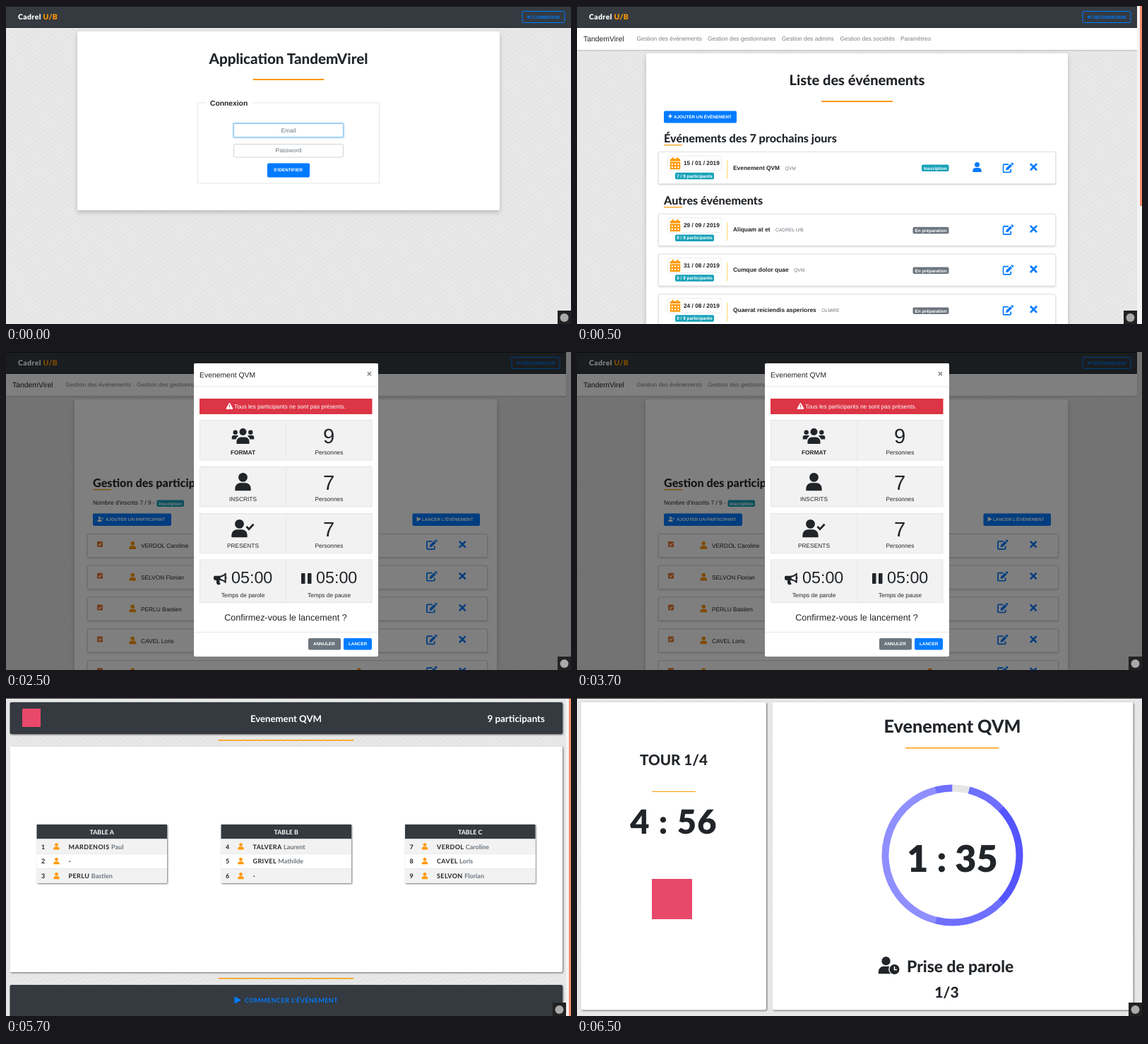
Recreate the animation shown at these times as an HTML page. Size 800x450 px, loop 8000 ms.

```html
<!DOCTYPE html>
<html lang="fr">
<head>
<meta charset="utf-8">
<title>Rencontres</title>
<style>
html, body { margin: 0; width: 100%; height: 100%; overflow: hidden; background: #e8e8e8; }
svg.stage { display: block; width: 100%; height: 100%; }
text { font-family: "Liberation Sans", Arial, sans-serif; fill: #212529; text-rendering: geometricPrecision; white-space: pre; }
.l { font-family: Lato, sans-serif; font-weight: 700; }
.h { font-family: Lato, sans-serif; font-weight: 800; }
.k { font-family: Lato, sans-serif; font-weight: 900; }
.b { font-weight: 700; }
.m { text-anchor: middle; }
.soft { filter: drop-shadow(0 3px 3px rgba(0,0,0,.2)); }
.hard { filter: drop-shadow(1px 1px 1.2px rgba(0,0,0,.55)); }
.ss { filter: drop-shadow(0 1px .8px rgba(0,0,0,.18)); }
.scene { visibility: hidden; animation: 8s step-end infinite; }
#login { animation-name: login; }
#list { animation-name: list; }
#launch { animation-name: launch; }
#tables { animation-name: tables; }
#timer { animation-name: timer; }
@keyframes login { 0% { visibility: visible } 6.25%, 100% { visibility: hidden } }
@keyframes list { 0% { visibility: hidden } 6.25% { visibility: visible } 31.25%, 100% { visibility: hidden } }
@keyframes launch { 0% { visibility: hidden } 31.25% { visibility: visible } 56.25%, 100% { visibility: hidden } }
@keyframes tables { 0% { visibility: hidden } 56.25% { visibility: visible } 81.25%, 100% { visibility: hidden } }
@keyframes timer { 0% { visibility: hidden } 81.25%, 100% { visibility: visible } }
</style>
</head>
<body>
<svg class="stage" viewBox="0 0 800 450">
  <defs>
    <pattern id="hatch" width="6" height="5" patternUnits="userSpaceOnUse" patternTransform="rotate(-35)">
      <rect width="6" height="5" fill="#e9e9e9"/><rect width="6" height="2.2" fill="#e4e4e4"/>
    </pattern>
    <symbol id="user" viewBox="0 0 16 16"><g fill="currentColor"><circle cx="8" cy="4" r="4"/><path d="M1 16v-2.2A4.8 4.8 0 0 1 5.8 9h4.4a4.8 4.8 0 0 1 4.8 4.8V16z"/></g></symbol>
    <symbol id="users" viewBox="0 0 32 22"><g fill="currentColor"><circle cx="16" cy="5" r="5"/><path d="M7 22v-3.5a6 6 0 0 1 6-6h6a6 6 0 0 1 6 6V22z"/><circle cx="5.2" cy="5.8" r="3.2"/><circle cx="26.8" cy="5.8" r="3.2"/><path d="M0 15.5V13a3 3 0 0 1 3-3h4.5q1.5 0 2.3.8-3 1.7-3.6 4.7zM32 15.5V13a3 3 0 0 0-3-3h-4.5q-1.5 0-2.3.8 3 1.7 3.6 4.7z"/></g></symbol>
    <symbol id="cal" viewBox="0 0 14 16"><path fill="currentColor" fill-rule="evenodd" d="M0 5V3.5Q0 2 1.5 2H3V0H5V2H9V0H11V2H12.5Q14 2 14 3.5V5zM0 6H14V14.5Q14 16 12.5 16H1.5Q0 16 0 14.5zM2 8V10H4V8zM6 8V10H8V8zM10 8V10H12V8zM2 12V14H4V12zM6 12V14H8V12zM10 12V14H12V12z"/></symbol>
    <symbol id="edit" viewBox="0 0 17 16"><path fill="none" stroke="currentColor" stroke-width="1.9" d="M9 3H2.5Q1 3 1 4.5V13.5Q1 15 2.5 15H11Q12.5 15 12.5 13.5V10.5"/><path fill="currentColor" d="M5.5 8.8L11.8 2.5 14.5 5.2 8.2 11.5 5 12zM12.6 1.7l1-1q.8-.7 1.6 0l1.2 1.2q.6.7 0 1.5l-1.1 1.1z"/></symbol>
    <symbol id="cross" viewBox="0 0 10 10"><path fill="none" stroke="currentColor" stroke-width="2.4" stroke-linecap="round" d="M1.5 1.5L8.5 8.5M8.5 1.5L1.5 8.5"/></symbol>
    <symbol id="plus" viewBox="0 0 10 10"><path fill="none" stroke="currentColor" stroke-width="2.4" d="M5 .5V9.5M.5 5H9.5"/></symbol>
    <symbol id="enter" viewBox="0 0 12 10"><path fill="currentColor" d="M0 3.5H3.5V1L8 5 3.5 9V6.5H0z"/><path fill="none" stroke="currentColor" stroke-width="1.5" d="M8 1H10Q11 1 11 2V8Q11 9 10 9H8"/></symbol>
    <symbol id="play" viewBox="0 0 10 10"><path fill="currentColor" d="M1 .5Q1-.3 2 .2L9.4 4.3Q10.2 5 9.4 5.7L2 9.8Q1 10.3 1 9.5z"/></symbol>
    <symbol id="horn" viewBox="0 0 20 18"><path fill="currentColor" fill-rule="evenodd" d="M2 5H8Q13 5 17 .8 18.2 0 18.2 1.5V6.5Q20 7.5 18.2 9.5V14.5Q18.2 16 17 15.2 13 11.5 8.5 11.2 8 14 10 16.5 9.5 18 8 18H5.5Q3.5 15 4 11.2H2Q0 11.2 0 9V7Q0 5 2 5zM16 4Q13 6.5 10 6.9V9.3Q13 9.8 16 12.2z"/></symbol>
    <symbol id="warn" viewBox="0 0 18 16"><path fill="currentColor" fill-rule="evenodd" d="M7.7.8Q9-.8 10.3.8L17.7 13.7Q18.3 16 16.3 16H1.7Q-.3 16 .3 13.7zM7.9 5L8.3 10.5H9.7L10.1 5zM7.8 12V14H10.2V12z"/></symbol>
  </defs>
</svg>
<script>
const BLUE = '#007bff', DARK = '#343a40', TEAL = '#17a2b8', GREY = '#6c757d', AMBER = '#ff9800', INK = '#212529';
const EVENT = 'Evenement QVM', APP = 'TandemVirel';

const rect = (x, y, w, h, fill, more = '') =>
  `<rect x="${x}" y="${y}" width="${w}" height="${h}" fill="${fill}" ${more}/>`;
const text = (x, y, s, size, cls = '', fill = INK, more = '') =>
  `<text x="${x}" y="${y}" font-size="${size}" class="${cls}" style="fill:${fill}" ${more}>${s}</text>`;
const icon = (id, x, y, w, h, color = BLUE) =>
  `<use href="#${id}" x="${x}" y="${y}" width="${w}" height="${h}" color="${color}"/>`;
const box = (x, y, w, h, stroke, fill = '#fff', more = '') =>
  rect(x + .5, y + .5, w - 1, h - 1, fill, `stroke="${stroke}" ${more}`);
const button = (x, y, w, h, s, tx, color = BLUE) =>
  rect(x, y, w, h, color, 'rx="2"') + text(tx, y + h / 2 + 1.7, s, 6.3, 'b', '#fff');
const badge = (x, y, w, s, color = TEAL) =>
  rect(x, y, w, 9.5, color, 'rx="2"') + text(x + w / 2, y + 7, s, 6.4, 'b m', '#fff');
const bar = (x, y, w, h = 2) => rect(x, y, w, h, AMBER, 'rx=".7"');
const panel = (x, y, w, h, fill = '#fff', shadow = 'hard') => rect(x, y, w, h, fill, `rx="2" class="${shadow}"`);
const page = rect(0, 0, 800, 450, 'url(#hatch)');
const topLine = rect(0, 0, 800, 1, '#3a3a3f');
const corner = x => rect(x, 431, 19, 19, '#222') + `<circle cx="${x + 9.5}" cy="441" r="6" fill="#aaa"/>`;
const scroll = h => rect(793, 0, 7, 450, '#f3f3f3') + rect(797, 0, 3, h, '#f58c6c');

const header = (w, label, bx) =>
  rect(0, 0, w, 30, DARK) + rect(0, 30, w, 1, '#221e29') + rect(0, 0, w, 1, '#15171a') +
  text(17, 19, `Cadrel <tspan fill="${AMBER}">U/B</tspan>`, 10.4, 'k', '#fff', 'letter-spacing=".4"') +
  box(bx, 7, w - bx - 8.5, 17, BLUE, 'none', 'rx="2"') +
  icon('enter', bx + 7, 12.5, 7, 6) + text(bx + 15.5, 17.8, label, 6.25, 'b', BLUE);

const links = [[84.5, 'Gestion des événements'], [185, 'Gestion des gestionnaires'], [290, 'Gestion des admins'],
  [372.5, 'Gestion des sociétés'], [458, 'Paramètres']];
const nav = rect(0, 31, 793, 31, '#fff', 'class="ss"') + text(9, 50, APP, 10.4) +
  links.map(([x, s]) => text(x, 49, s, 8.35, '', '#7f7f7f')).join('');
const heading = (y, s) => text(123, y, s, 16.2, 'h') + rect(123, y + 3.2, 26, 1.2, AMBER);

const login = () => page + header(800, 'CONNEXION', 730.5) + panel(101, 36, 598, 253, '#fff', 'soft') +
  text(400, 82, 'Application ' + APP, 20.6, 'h m') + bar(349.5, 103, 101) +
  box(271, 136.5, 258, 115, '#e6e6e6') + rect(284, 134, 65, 6, '#fff') +
  text(289, 141, 'Connexion', 10.3, 'b') +
  rect(320.5, 164.5, 159, 23, '#c4e2fa', 'rx="3"') +
  box(322, 166, 156, 20, '#86c3f2', '#fff', 'rx="2"') + text(400, 179, 'Email', 8.4, 'm', GREY) +
  box(322, 195, 156, 19.5, '#ced4da', '#fff', 'rx="2"') + text(400, 207, 'Password', 8.4, 'm', GREY) +
  button(370, 222.5, 60, 20, "S'IDENTIFIER", 379) + corner(781);

const events = [
  [206, '15 / 01 / 2019', '7', EVENT, 'QVM'],
  [293.7, '29 / 09 / 2019', '0', 'Aliquam at et', 'CADREL U/B'],
  [350.6, '31 / 08 / 2019', '0', 'Cumque dolor quae', 'QVM'],
  [407.5, '24 / 08 / 2019', '0', 'Quaerat reiciendis asperiores', 'OLMIRE']];
const eventRow = ([y, date, n, name, org], i) => `<g transform="translate(0 ${y})">` +
  box(115, 0, 563, 46, '#e2e2e2', '#fff', 'rx="1" class="ss"') +
  box(128, 5.5, 77, 22, '#ececec', '#fff', 'rx="2"') + icon('cal', 131.5, 8, 15, 17.5, AMBER) +
  text(151, 19.2, date, 8.3, 'b') + badge(139, 29.7, 55, n + ' / 9 participants') +
  rect(212, 12.5, 1.5, 26, '#ffe08a') +
  text(221, 25.8, `${name}<tspan dx="7.5" font-size="6.67" font-weight="400" fill="${GREY}">${org}</tspan>`, 8.4, 'b') +
  (i ? badge(475.5, 19, 51, 'En préparation', GREY) : badge(488, 18.5, 38.5, 'Inscription') + icon('user', 559, 15, 15, 14)) +
  icon('edit', 602.5, 15, 16, 15.5) + icon('cross', 641, 16.3, 11, 11) + '</g>';

const list = () => page + header(793, 'DÉCONNEXION', 715.5) + nav + panel(98, 67, 597, 400, '#fff', 'soft') +
  text(396.5, 112, 'Liste des événements', 20, 'h m') + bar(346, 134, 101) +
  button(123, 148.5, 103, 17, 'AJOUTER UN ÉVÉNEMENT', 137) + icon('plus', 129, 153, 6, 6, '#fff') +
  heading(193, 'Événements des 7 prochains jours') + heading(281, 'Autres événements') +
  events.map(eventRow).join('') + scroll(283) + corner(774);

const people = { a: ['VERDOL', 'Caroline'], b: ['SELVON', 'Florian'], c: ['PERLU', 'Bastien'], d: ['CAVEL', 'Loris'],
  e: ['MARDENOIS', 'Paul'], f: ['TALVERA', 'Laurent'], g: ['GRIVEL', 'Mathilde'], _: ['-', ''] };
const personRow = (id, i) => `<g transform="translate(0 ${257 + i * 44.8})">` +
  box(115, 0, 567, 34, '#d8d8d8', '#fff', 'rx="1" class="ss"') +
  rect(129, 11, 8, 8, '#e8742c', 'rx="1"') +
  '<path d="M130.8 15l1.7 1.8 3-3.5" fill="none" stroke="#fff" stroke-width="1.2"/>' +
  icon('user', 173.5, 11, 11.5, 11, AMBER) + text(191, 20.2, people[id].join(' '), 8.33) +
  icon('user', 494, 11, 11.5, 11, AMBER) +
  icon('edit', 595, 8, 16, 15) + icon('cross', 641, 10, 10.5, 10.5) + '</g>';

const infoBox = (y, h) => box(274, y, 244.5, h, '#dfe7e9', '#f2f2f2') + rect(396, y + 1, 1, h - 2, '#e4e8ea');
const stat = (y, n, label, cls, ico) => infoBox(y, 57.5) + ico +
  text(335.5, y + 49, label, 8.35, 'm ' + cls) + text(457, y + 33.3, n, 29.2, 'm') +
  text(457.5, y + 49, 'Personnes', 8.35, 'm');
const modal = () => rect(266, 16, 261, 415, '#fff', 'rx="2"') +
  text(274, 36, EVENT, 10.4) + text(514.5, 34.5, '×', 12.5, 'b m', '#7f7f7f') +
  rect(266, 48.5, 261, 1, '#e4e7ea') + rect(274, 66, 244.5, 22, '#dc3545') +
  icon('warn', 311.5, 72, 10, 9, '#fff') + text(323, 79.8, 'Tous les participants ne sont pas présents.', 8.35, '', '#fff') +
  stat(96, 9, 'FORMAT', 'b', icon('users', 319.5, 108, 32, 22, INK)) +
  stat(162, 7, 'INSCRITS', '', icon('user', 322.5, 171, 26, 25.5, INK)) +
  stat(228, 7, 'PRESENTS', '', icon('user', 317.5, 237, 26, 25.5, INK) +
    `<path d="M340.5 247l3.5 3.8 6.5-7" fill="none" stroke="${INK}" stroke-width="2.8"/>`) +
  infoBox(293.5, 61.5) + icon('horn', 294, 312, 19.5, 17.5, INK) + text(319, 327, '05:00', 23.3) +
  rect(418, 313, 5.5, 15, INK, 'rx="1"') + rect(427, 313, 5.5, 15, INK, 'rx="1"') + text(439, 327, '05:00', 23.3) +
  text(335.5, 346.5, 'Temps de parole', 8.35, 'm') + text(457.5, 346.5, 'Temps de pause', 8.35, 'm') +
  text(396, 380, 'Confirmez-vous le lancement ?', 12.6, 'm') + rect(266, 396, 261, 1, '#e4e7ea') +
  button(428, 405, 46, 16.5, 'ANNULER', 435, GREY) + button(478, 405, 40, 16.5, 'LANCER', 485);

const launch = () => page + header(793, 'DÉCONNEXION', 715.5) + nav + panel(97, 67, 598, 400, '#fff', 'soft') +
  heading(191, 'Gestion des participants') + text(123, 216, "Nombre d'inscrits 7 / 9 -", 8.35) +
  badge(213.5, 209.5, 38.5, 'Inscription') +
  button(123, 228.5, 111, 17.5, 'AJOUTER UN PARTICIPANT', 141) + icon('user', 129, 233, 7, 7, '#fff') + icon('plus', 135, 234, 3.5, 3.5, '#fff') +
  button(575.5, 228.5, 95.5, 17.5, "LANCER L'ÉVÉNEMENT", 589) + icon('play', 581, 233, 6.5, 7, '#fff') +
  ['a', 'b', 'c', 'd', 'e'].map(personRow).join('') +
  rect(0, 0, 800, 450, '#000', 'opacity=".5"') + modal() + corner(781);

const table = (x, letter, ids, first) => `<g transform="translate(${x} 179)">` +
  rect(0, 0, 184.5, 83, '#fff', 'class="hard"') + rect(0, 0, 184.5, 20.5, DARK) +
  text(92.2, 13.7, 'TABLE ' + letter, 8.9, 'l m', '#fff') +
  [...ids].map((id, i) => {
    const y = 20.5 + i * 20.9, [last, given] = people[id];
    return rect(0, y, 184.5, 20.7, i % 2 ? '#fff' : '#f2f2f2') + rect(0, y, 184.5, .7, '#dee2e6') +
      text(6.5, y + 14, first + i, 9, 'l') + icon('user', 23, y + 5.7, 10, 9.5, AMBER) +
      text(45, y + 14, `${last} <tspan fill="${GREY}" letter-spacing="0">${given}</tspan>`, 9, 'l', INK, 'letter-spacing=".4"');
  }).join('') + '</g>';

const tables = () => page + scroll(450) + topLine + panel(5.5, 6, 782.5, 45, DARK) +
  rect(23, 15, 26, 26, '#e8486a') +
  text(396.5, 34, EVENT, 13.2, 'l m', '#fff') + text(763, 34, '9 participants', 13.4, 'l', '#fff', 'text-anchor="end"') +
  bar(300.5, 59, 192, 1.5) + panel(5.5, 68.5, 782.5, 319.5) +
  table(43.5, 'A', 'e_c', 1) + table(304.5, 'B', 'fg_', 4) + table(565, 'C', 'adb', 7) +
  bar(300.5, 396, 192, 1.5) + panel(5.5, 406, 782.5, 50, DARK) + icon('play', 322.5, 422.5, 10, 10) +
  text(338, 430.7, "COMMENCER L'ÉVÉNEMENT", 9, 'l', BLUE, 'letter-spacing=".5"') + corner(774);

// Angles in degrees, clockwise from the top
const arc = (from, to, color) =>
  `<circle cx="531.5" cy="222.5" r="95" fill="none" stroke="${color}" stroke-width="10" pathLength="360"
    stroke-dasharray="${to - from} 360" transform="rotate(${from - 90} 531.5 222.5)"/>`;
const timer = () => page + topLine + panel(5.5, 6, 262.5, 435.5) + panel(276.5, 6, 511, 435.5) +
  text(137, 95, 'TOUR 1/4', 20.6, 'h m') + bar(106, 132, 62, 1) +
  text(137, 191.5, '4 : 56', 47, 'k m', INK, 'letter-spacing="1.3"') + rect(106, 256, 57, 57, '#e8486a') +
  text(531.5, 49, EVENT, 25.2, 'h m') + bar(465, 70, 132.5, 1.5) +
  arc(0, 14.3, '#e6e6e6') + arc(14.3, 46, '#6f6fff') + arc(46, 134, '#5555ff') +
  arc(134, 194.5, '#6f6fff') + arc(194.5, 345.5, '#8f8fff') + arc(345.5, 360, '#7070ff') +
  text(531.5, 246, '1 : 35', 52, 'k m') +
  icon('user', 425, 366, 25, 24.5, INK) + '<circle cx="449.5" cy="384" r="8.3" fill="#fff"/>' +
  `<circle cx="449.5" cy="384" r="7" fill="${INK}"/><path d="M449.5 380v4.5h3.5" fill="none" stroke="#fff" stroke-width="1.5"/>` +
  text(467, 388, 'Prise de parole', 22.8, 'h') + text(523.5, 424, '1/3', 21, 'h m') + corner(781);

const stage = document.querySelector('.stage');
stage.insertAdjacentHTML('beforeend', Object.entries({ login, list, launch, tables, timer })
  .map(([id, draw]) => `<g id="${id}" class="scene">${draw()}</g>`).join(''));
</script>
</body>
</html>
```
